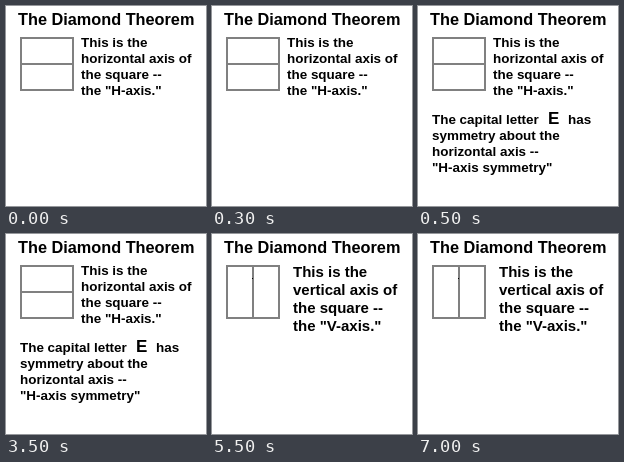
Animation, 200 px wide and 200 px high, one loop 8 s. Source, as an HTML page:

```html
<!DOCTYPE html>
<html lang="en">
<head>
<meta charset="utf-8">
<title>The Diamond Theorem</title>
<style>
  html, body { margin: 0; width: 100%; height: 100%; overflow: hidden; background: #fff; }
  svg { display: block; width: 100vw; height: 100vh; }
  text { font: bold 13.45px "Liberation Sans", Arial, sans-serif; white-space: pre; }
  .title { font-size: 16.3px; }
  .large { font-size: 15px; }
  .letter { font-size: 17px; }
  .square { fill: none; stroke: #808080; stroke-width: 2; }
</style>
</head>
<body>
<svg viewBox="0 0 200 200">
  <text class="title" x="12" y="19">The Diamond Theorem</text>
  <path class="square" d="M15 32h52v52h-52z"/>
  <g id="horizontal">
    <path class="square" d="M15 58h52"/>
  </g>
  <g id="symmetry">
    <text class="letter" x="130" y="118">E</text>
    <text x="150" y="118">has</text>
  </g>
  <g id="vertical">
    <path class="square" d="M41 32v52"/>
    <rect x="40" y="44" width="1" height="1"/>
  </g>
</svg>
<script>
  const LOOP = 8000;
  const scenes = [
    { id: "horizontal", from: 0, to: 5500, x: 75, y: 41, step: 16,
      lines: ["This is the", "horizontal axis of", "the square --", 'the "H-axis."'] },
    { id: "symmetry", from: 500, to: 5500, x: 14, y: 118, step: 16,
      lines: ["The capital letter", "symmetry about the", "horizontal axis --", '"H-axis symmetry"'] },
    { id: "vertical", from: 5500, to: LOOP, x: 81, y: 43, step: 18, style: "large",
      lines: ["This is the", "vertical axis of", "the square --", 'the "V-axis."'] },
  ];

  for (const scene of scenes) {
    scene.group = document.getElementById(scene.id);
    scene.lines.forEach((line, i) => {
      const text = document.createElementNS("http://www.w3.org/2000/svg", "text");
      text.setAttribute("x", scene.x);
      text.setAttribute("y", scene.y + i * scene.step);
      text.setAttribute("class", scene.style || "");
      text.textContent = line;
      scene.group.append(text);
    });
  }

  const start = performance.now();
  function draw() {
    const time = (performance.now() - start) % LOOP;
    for (const { group, from, to } of scenes) {
      group.style.display = time >= from && time < to ? "" : "none";
    }
    requestAnimationFrame(draw);
  }
  draw();
</script>
</body>
</html>
```
